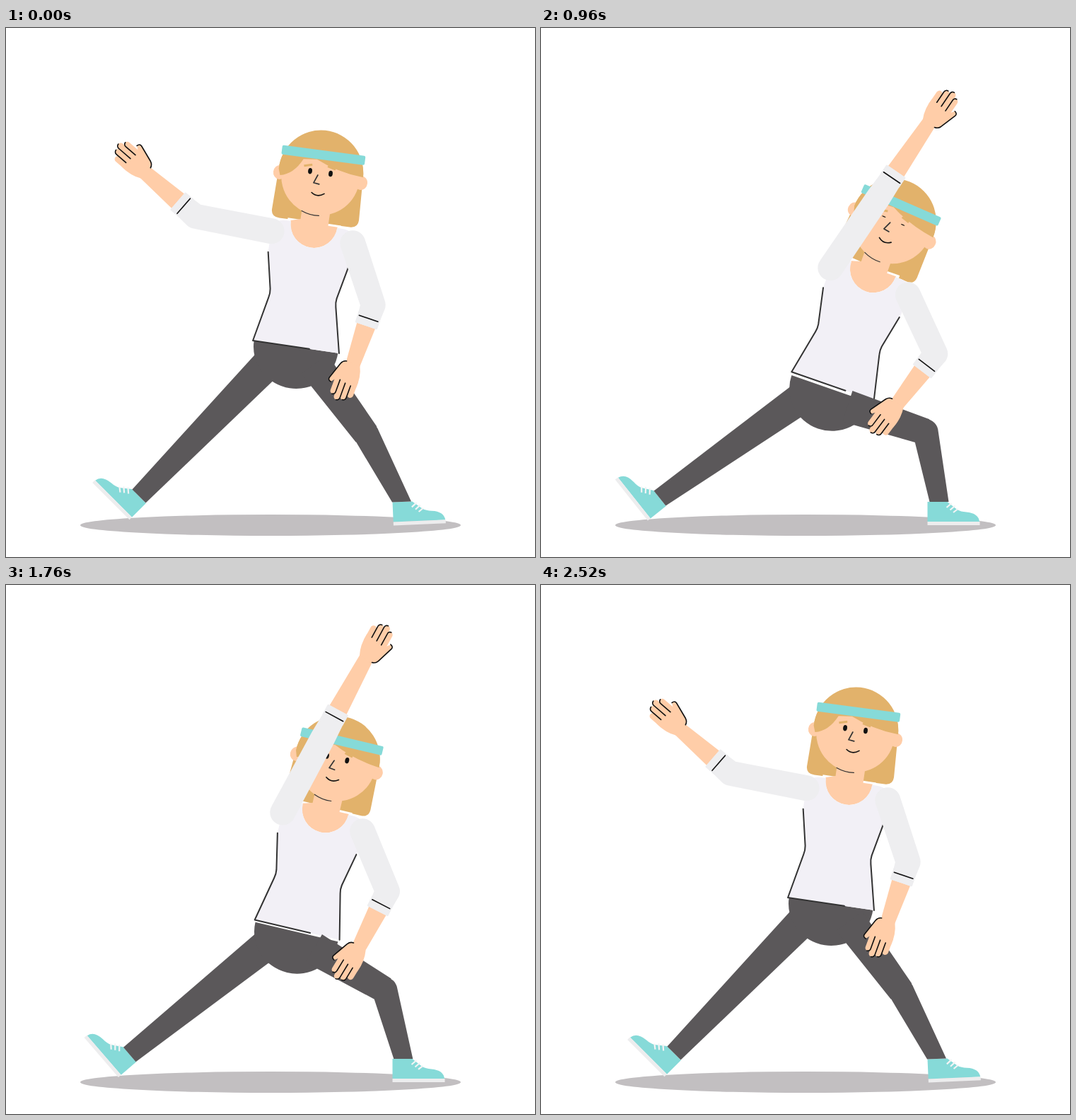
Animation of 748 by 748 pixels, one loop 3.16 s. Source, as an HTML page:

```html
<!DOCTYPE html>
<html lang="en">
<head>
<meta charset="utf-8">
<title>Side stretch</title>
<style>
  html, body { margin: 0; width: 100%; height: 100%; overflow: hidden; background: #fff; }
  svg { display: block; width: 100%; height: 100%; }
  .skin { fill: #ffcda8; }
  .hair { fill: #e2b26b; }
  .teal { fill: #86dad8; }
  .pants { fill: #5b585a; }
  .shirt { fill: #f2f0f6; }
  .sleeve { fill: #eeeef0; }
  .line, .thin, .finger, .brow, .lace { fill: none; stroke-linecap: round; stroke-linejoin: round; }
  .line { stroke: #333; stroke-width: 2; }
  .thin { stroke: #111; stroke-width: 1.6; }
  .finger { stroke: #ffcda8; stroke-width: 9; }
  .brow { stroke: #e2b26b; stroke-width: 3; stroke-linecap: butt; }
  .lace { stroke: #f4f4f5; stroke-width: 2.2; stroke-linecap: butt; }
</style>
</head>
<body>
<svg viewBox="0 0 748 748">
  <defs>
    <g id="shoe">
      <path class="teal" d="M-14 0H14L28 11Q33 14 41 14.5Q58 16 59.5 28H-14Z"/>
      <path d="M-14 28H60V33H-14Z" fill="#ededee"/>
      <path class="lace" d="M13 8L20 2M18 11.5L25 5.5M22.5 15L29 10"/>
    </g>
    <g id="hand">
      <path class="finger" d="M-13 18V40M-5.5 18V46M3 18V43M11 18V37"/>
      <path class="skin" d="M-10 -6Q-15 -5 -17 0L-25 24Q-26 28 -21 29L-15 21V26H15.5Q17 8 10 -6Z"/>
      <path class="thin" d="M-10 -6Q-15 -5 -17 0L-25 24Q-26 28 -21 29
        M7.2 25V43a4.3 4.3 0 0 1 -4.3 4.4M-1.2 24V46a4.3 4.3 0 0 1 -4.3 4.4M-9.7 22V40a4 4 0 0 1 -4 4.4"/>
    </g>
    <g id="cuff">
      <rect class="sleeve" x="-16.5" y="-17" width="33" height="17" rx="1"/>
      <path class="thin" d="M-14 -11H14"/>
    </g>
  </defs>

  <ellipse cx="374" cy="703" rx="269" ry="15" fill="#c2bfc1"/>
  <use id="shoeL" href="#shoe"/>
  <use id="shoeR" href="#shoe"/>
  <path id="legL" class="pants"/>

  <path id="hairBack" class="hair" d="M-60 -62A60 60.5 0 0 1 60 -62L62 -4Q62 7 50 7H-50Q-62 7 -62 -4Z"/>

  <g id="torso">
    <path id="pelvis" class="pants" d="M-60 0A60 59 0 0 0 60 0Z"/>
    <path d="M-38 -179H38V-172H-38Z" fill="#fff"/>
    <path class="skin" d="M-20 -205H20V-176H33.5A33.5 34 0 0 1 -33.5 -176L-20 -180Z"/>
    <path class="shirt" d="M-61.6 0L-48.5 -64Q-47 -70 -48 -75L-58.5 -127V-157Q-58 -175 -40 -175H-33
      A33 33 0 0 0 33 -175H40Q58 -175 58 -157V-127L48 -75Q47 -70 48.5 -64L61.6 0Z"/>
    <path class="line" d="M-58.5 -127L-48 -76Q-47 -70 -48.5 -64L-61.6 0H19M57 -123L47 -76Q46 -70 47.5 -64L61.6 0"/>
  </g>

  <g id="head">
    <ellipse class="skin" cx="-58" cy="-57" rx="9" ry="10"/>
    <ellipse class="skin" cx="58" cy="-57" rx="9" ry="10"/>
    <circle class="skin" cy="-59" r="55.5"/>
    <path class="hair" d="M-60 -62L-57 -53Q-38 -57 -27 -80L-8 -82Q22 -68 60 -65A60 60.5 0 0 0 -60 -62Z"/>
    <rect class="teal" x="-59" y="-95.5" width="118.5" height="13" rx="2"/>
    <path class="brow" d="M-25 -70.5L-13.5 -73.5M8.5 -74L20 -71"/>
    <g id="eyes" fill="#111">
      <ellipse cx="-15.5" rx="2.9" ry="4.2"/>
      <ellipse cx="13.7" rx="2.9" ry="4.2"/>
    </g>
    <path class="line" style="stroke-width:1.7" d="M-4 -60L-8.5 -48.5L-0.5 -47.5"/>
    <path class="thin" d="M-9.5 -34.5Q-1 -28 8.5 -35"/>
    <path class="line" style="stroke-width:1.1" d="M-20 -7Q-8 -2 5 -3.3"/>
  </g>

  <path id="legR" class="pants"/>
  <path id="foreR" class="skin"/>
  <use id="handR" href="#hand"/>
  <path id="sleeveR" class="sleeve"/>
  <use id="cuffR" href="#cuff"/>
  <path id="foreL" class="skin"/>
  <use id="handL" href="#hand"/>
  <path id="sleeveL" class="sleeve"/>
  <use id="cuffL" href="#cuff"/>
</svg>

<script>
const LOOP = 3160, END = 2520, STEP = 40;
const RAD = Math.PI / 180;
const el = id => document.getElementById(id);

// Three key poses; swing is the raised arm against the torso, bend its elbow.
const REST = { x: 410, y: 451, tilt: 8.4, swing: 177.4, bend: 30, handX: 489, handY: 480, handTurn: 20, lunge: 0 };
const BACK = { x: 407.5, y: 443, tilt: -4.6, swing: 143.4, bend: 7, handX: 486, handY: 480, handTurn: 27, lunge: 0 };
const LOW = { x: 412.5, y: 506.5, tilt: 19.2, swing: 75, bend: 0, handX: 501, handY: 535, handTurn: 37, lunge: 1 };

// On the way up the torso leads, the body follows and the arm comes last.
const RISE = { tilt: [1240, 2220], bend: [1720, 2320], swing: [1880, 2420], body: [1380, 2340] };
const NODS = [-0.9, -5, 4.6, -2.4, 2.6, -0.9];

const clamp = v => Math.max(0, Math.min(1, v));
const span = (t, a, b) => clamp((t - a) / (b - a));
const ease = s => (1 - Math.cos(Math.PI * s)) / 2;
const lerp = (a, b, f) => a + (b - a) * f;

function poseAt(t) {
  const lean = ease(span(t, 0, 400));
  const drop = ease(Math.sqrt(span(t, 400, 960)));
  const pose = {};
  for (const key in REST) {
    const rise = ease(span(t, ...(RISE[key] || RISE.body)));
    pose[key] = lerp(lerp(lerp(REST[key], BACK[key], lean), LOW[key], drop), REST[key], rise);
  }
  return pose;
}

function nodAt(t) {
  const s = t / END * (NODS.length - 1);
  const i = Math.min(Math.floor(s), NODS.length - 2);
  return lerp(NODS[i], NODS[i + 1], ease(s - i));
}

// Eyelids stay shut for `hold` ms on both sides of `mid`.
const lid = (t, mid, hold) => clamp((Math.abs(t - mid) - hold) / 100);

const polar = (p, deg, r) => [p[0] + r * Math.cos(deg * RAD), p[1] + r * Math.sin(deg * RAD)];
const mix = (a, b, f) => [lerp(a[0], b[0], f), lerp(a[1], b[1], f)];
const heading = (a, b) => Math.atan2(b[1] - a[1], b[0] - a[0]) / RAD;
const place = (id, p, deg, extra = "") =>
  el(id).setAttribute("transform", `translate(${p[0]} ${p[1]}) rotate(${deg}) ${extra}`);
const draw = (id, d) => el(id).setAttribute("d", d);

// Middle joint of a two-bone limb; the bones stretch when the end is out of reach.
function joint(a, b, upper, lower, slack) {
  const d = Math.hypot(b[0] - a[0], b[1] - a[1]);
  const k = Math.max(1, d * slack / (upper + lower));
  const u = upper * k, l = lower * k;
  const angle = Math.acos((u * u + d * d - l * l) / (2 * u * d)) / RAD;
  return polar(a, heading(a, b) - angle, u);
}

// Tapered bar from a to b; cut is the direction of its edge at b.
function limb(a, b, wa, wb, cut) {
  const n = heading(a, b) + 90, m = cut === undefined ? n : cut;
  const pts = [polar(a, n, wa / 2), polar(b, m, wb / 2), polar(b, m, -wb / 2), polar(a, n, -wa / 2)];
  return "M" + pts.map(p => p.map(v => v.toFixed(2)).join(" ")).join("L") + "Z";
}
const disc = (p, r) =>
  `M${p[0] - r} ${p[1]}a${r} ${r} 0 0 0 ${2 * r} 0a${r} ${r} 0 0 0 ${-2 * r} 0Z`;

function drawArm(side, shoulder, elbow, wrist, turn) {
  const cuff = mix(elbow, wrist, .335);
  draw("fore" + side, limb(mix(elbow, wrist, .25), wrist, 28, 20));
  place("hand" + side, wrist, turn);
  draw("sleeve" + side, disc(shoulder, 18) + limb(shoulder, elbow, 36, 35)
    + disc(elbow, 17.5) + limb(elbow, cuff, 35, 31));
  place("cuff" + side, cuff, heading(elbow, wrist) - 90);
}

function render(t) {
  const { x, y, tilt, swing, bend, handX, handY, handTurn, lunge } = poseAt(t);
  const hem = [x, y];
  const onTorso = (px, py) => polar(polar(hem, tilt, px), tilt + 90, py);

  place("torso", hem, tilt);
  place("pelvis", [0, 4.5 * lunge], 0);
  const neck = onTorso(0, -185), nod = tilt + nodAt(t);
  place("hairBack", neck, nod);
  place("head", neck, nod);
  const open = Math.max(.15, Math.min(lid(t, 820, 220), lid(t, 1960, 40)));
  place("eyes", [0, -64.3], 0, `scale(1 ${open})`);

  const heel = [188 - 20 * lunge, 662 + 3 * lunge], heelTurn = 45 + 6.5 * lunge;
  place("shoeL", heel, heelTurn, "scale(-1 1)");
  draw("legL", limb(onTorso(-29, 20), heel, 45.5, 27, heelTurn + 180));

  const hip = onTorso(29, 20), ankle = [559.5 + 3.5 * lunge, 670];
  const knee = joint(hip, ankle, 116, 101, 1.003);
  const lift = -2.5 * clamp(1 - lunge * 1.5);
  place("shoeR", [560.5, 670], lift);
  draw("legR", limb(hip, knee, 46, 37) + disc(knee, 18) + limb(knee, ankle, 36, 27, lift + 180));

  const shoulderR = onTorso(58, -157), hand = [handX, handY];
  drawArm("R", shoulderR, joint(shoulderR, hand, 92, 93.5, 1.025), hand, handTurn);

  // The raised arm looks shorter as its elbow bends towards the viewer.
  const shoulderL = onTorso(-58, -157);
  const upper = tilt - swing, fore = upper + bend;
  const elbow = polar(shoulderL, upper, 121 - .38 * bend);
  drawArm("L", shoulderL, elbow, polar(elbow, fore, 132 - 1.1 * bend), 270 + fore);
}

const start = performance.now();
function tick() {
  const t = (performance.now() - start) % LOOP;
  render(Math.min(END, Math.floor(t / STEP) * STEP));
  requestAnimationFrame(tick);
}
render(0);
requestAnimationFrame(tick);
</script>
</body>
</html>
```
